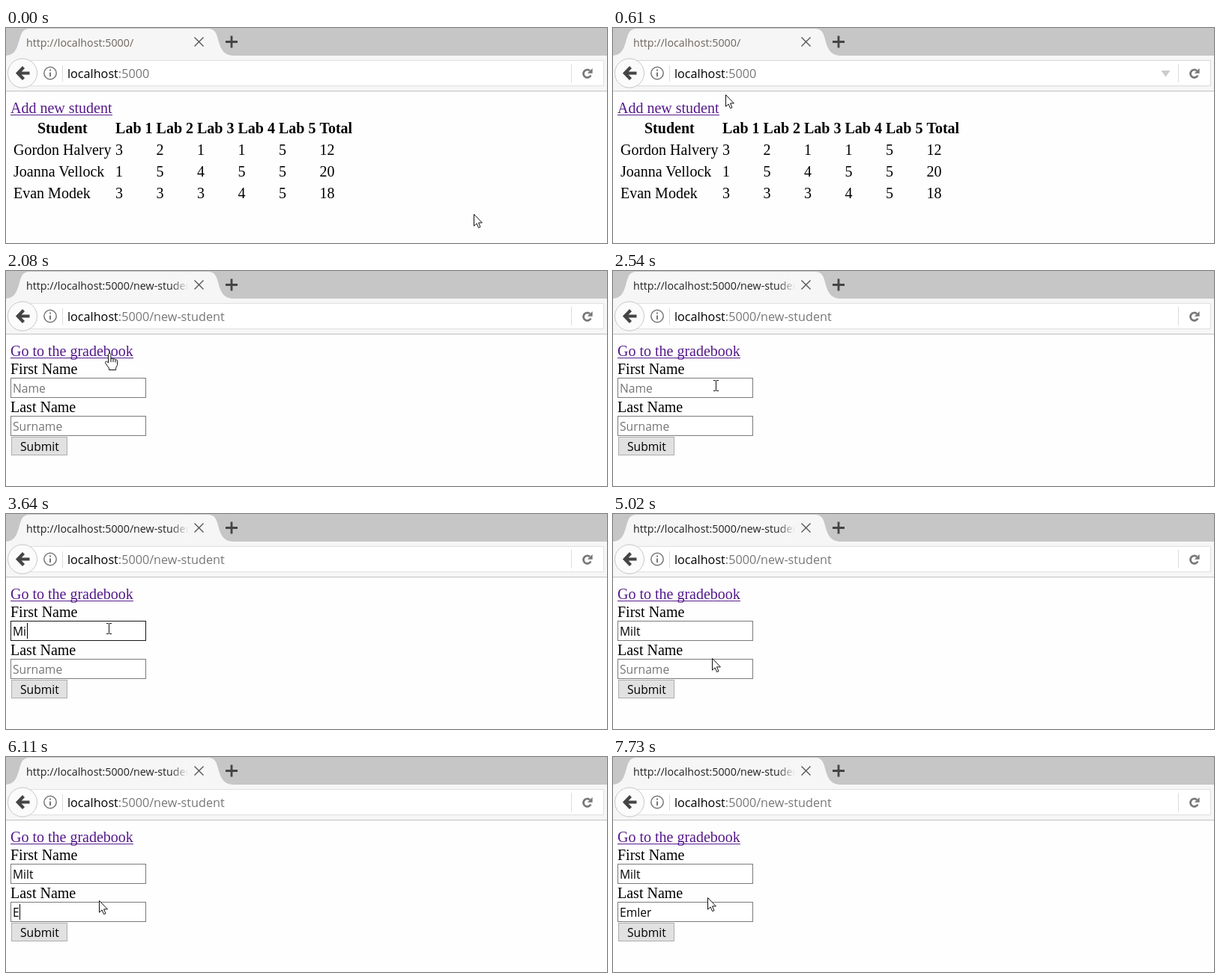
Write an HTML page that moves like this. It is 802 px wide and 288 px high and loops after 8 s.

```html
<!DOCTYPE html>
<html lang="en">
<head>
<meta charset="utf-8">
<title>Gradebook</title>
<style>
html, body { margin: 0; width: 100%; height: 100%; overflow: hidden; background: #fefefe; }
svg { position: absolute; left: 0; top: 0; }
.ui { font-family: "Open Sans", "Noto Sans", sans-serif; }
.page { font: 20px "Liberation Serif", "Times New Roman", serif; }
.head { font-weight: bold; }
.link { fill: #551a8b; }
.tab { font-size: 14.25px; }
.url { font-size: 16.2px; }
.field { font-size: 15.65px; }
.hint { fill: #757575; }
.box { fill: #fff; stroke: #7a7a7a; }

/* All times are fractions of one 8 s loop: 1% = 80 ms */
.step { animation: 8s step-end infinite; }

.list { animation-name: list; }
.form { animation-name: form; }
@keyframes list { 0% { opacity: 1 } 23.25%, 100% { opacity: 0 } }
@keyframes form { 0% { opacity: 0 } 23.25%, 100% { opacity: 1 } }

.bar-hover { animation: bar 8s linear infinite; }
@keyframes bar { 0%, 2.9% { opacity: 0 } 4.5%, 7% { opacity: 1 } 9.5%, 100% { opacity: 0 } }

.box1 { animation-name: box1; }
.box2 { animation-name: box2; }
@keyframes box1 { 0% { stroke: #7a7a7a } 33.875% { stroke: #171717 } 61.75%, 100% { stroke: #7a7a7a } }
@keyframes box2 { 0% { stroke: #7a7a7a } 64.75% { stroke: #171717 } 68.25%, 100% { stroke: #7a7a7a } }

.hint1 { animation-name: hint1; }
.hint2 { animation-name: hint2; }
@keyframes hint1 { 0% { opacity: 1 } 41.5%, 100% { opacity: 0 } }
@keyframes hint2 { 0% { opacity: 1 } 76.375%, 100% { opacity: 0 } }

/* Typed text: the width reveals letters, the right border is the caret */
.typed {
  position: absolute; left: 9px; width: 0; height: 21px; line-height: 22px;
  overflow: hidden; white-space: pre; color: #000;
  border-right: 1px solid transparent;
}
.first { top: 146px; animation-name: type1, caret1; }
.last { top: 197px; animation-name: type2, caret2; }
@keyframes type1 {
  0% { width: 0 } 41.5% { width: 14.6px } 45.5% { width: 18.6px }
  49.375% { width: 22.5px } 51.25%, 100% { width: 27.6px }
}
@keyframes caret1 {
  0% { border-color: transparent } 33.875% { border-color: #000 }
  38.625% { border-color: transparent } 41.5% { border-color: #000 }
  57% { border-color: transparent } 63.75% { border-color: #000 }
  66.625%, 100% { border-color: transparent }
}
@keyframes type2 {
  0% { width: 0 } 76.375% { width: 9px } 82.125% { width: 23.3px }
  85% { width: 27.3px } 87.875% { width: 36px } 88.875%, 100% { width: 42.4px }
}
@keyframes caret2 {
  0% { border-color: transparent } 67.6% { border-color: #000 }
  72.375% { border-color: transparent } 76.375% { border-color: #000 }
  95.75%, 100% { border-color: transparent }
}

.pointer { animation: move 8s linear infinite; }
@keyframes move {
  0%, .5% { transform: translate(624px, 249px); animation-timing-function: ease-out }
  4.75%, 6.4% { transform: translate(163px, 64px) }
  7.6%, 8.5% { transform: translate(150px, 89px); animation-timing-function: ease-out }
  11.5%, 22% { transform: translate(138px, 106px) }
  22.3%, 26.9% { transform: translate(138px, 110px); animation-timing-function: ease-in-out }
  31.75%, 60.8% { transform: translate(137px, 153px) }
  62.7%, 63.7% { transform: translate(132px, 193px) }
  64.75%, 66.6% { transform: translate(128px, 206px) }
  68.625%, 96.5% { transform: translate(124px, 192px) }
  96.6%, 100% { transform: translate(126px, 188px) }
}
.arrow { animation-name: arrow; }
.hand { animation-name: hand; }
.beam { animation-name: beam; }
@keyframes arrow {
  0% { opacity: 1 } 2.9% { opacity: 0 } 7% { opacity: 1 } 10% { opacity: 0 }
  28.4% { opacity: 1 } 30.2% { opacity: 0 } 61.75% { opacity: 1 }
  63.9% { opacity: 0 } 68%, 100% { opacity: 1 }
}
@keyframes hand { 0% { opacity: 0 } 10% { opacity: 1 } 28.4%, 100% { opacity: 0 } }
@keyframes beam {
  0% { opacity: 0 } 2.9% { opacity: 1 } 7% { opacity: 0 } 30.2% { opacity: 1 }
  61.75% { opacity: 0 } 63.9% { opacity: 1 } 68%, 100% { opacity: 0 }
}
</style>
</head>
<body>
<svg width="802" height="288" viewBox="0 0 802 288">
  <defs>
    <linearGradient id="fade">
      <stop offset="0" stop-color="#f6f6f6" stop-opacity="0"/>
      <stop offset="1" stop-color="#f6f6f6"/>
    </linearGradient>
    <clipPath id="title"><path d="M20 0H242V37H20Z"/></clipPath>
  </defs>

  <!-- Browser chrome -->
  <path fill="#c6c6c6" d="M0 0H802V37H0Z"/>
  <path fill="#f6f6f6" d="M0 37C11 36 14 29 17 19C20 7 22 1 31 1H270C279 1 281 7 284 19C287 29 291 36 302 37H802V84H0Z"/>
  <path stroke="#c2c2c2" d="M0 84.5H802"/>
  <g class="ui tab">
    <text class="step list" x="27" y="24.5" fill="#6e655e">http://localhost:5000/</text>
    <g class="step form" clip-path="url(#title)">
      <text x="27" y="24.5" fill="#222">http://localhost:5000/new-student</text>
      <path fill="url(#fade)" d="M220 4H243V34H220Z"/>
    </g>
  </g>
  <path stroke="#555" stroke-width="1.4" d="M251.5 12.5L263.5 24.5M263.5 12.5L251.5 24.5"/>
  <path stroke="#444" stroke-width="2.8" d="M293 18.5H309M301 10.5V26.5"/>

  <path fill="#fff" stroke="#e0e0e0" d="M32.5 43.5H797.5V77.5H32.5Z"/>
  <g class="bar-hover">
    <path fill="none" stroke="#d6d6d6" d="M32.5 43.5H797.5V77.5H32.5Z"/>
    <path fill="#bbb" d="M731.5 57H743.5L737.5 65.5Z"/>
  </g>
  <circle cx="22" cy="60.5" r="19.5" fill="#fbfbfb" stroke="#c6c6c6"/>
  <path fill="none" stroke="#444" stroke-width="4.2" d="M23.5 52.5L15.8 60.5L23.5 68.5M15.8 60.5H31.5"/>
  <circle cx="59" cy="60.5" r="8.2" fill="none" stroke="#777" stroke-width="1.5"/>
  <path stroke="#777" stroke-width="2" d="M59 59.5V65M59 55.5V57.5"/>
  <path stroke="#dcdcdc" d="M75.5 50V72M754.5 48V73"/>
  <path fill="none" stroke="#777" stroke-width="2.7" d="M780.4 63.5A5.2 5.2 0 1 1 779.1 57.2"/>
  <path fill="#777" d="M782.6 54V60.8H775.8Z"/>
  <g class="ui url">
    <text x="82" y="67">localhost<tspan fill="#777">:5000</tspan></text>
    <g class="step form">
      <path fill="#fff" d="M80 48H400V73H80Z"/>
      <text x="82" y="67">localhost<tspan fill="#777">:5000/new-student</tspan></text>
    </g>
  </g>

  <!-- Grade list -->
  <g class="page step list">
    <text class="link" x="6" y="114">Add new student</text>
    <path stroke="#551a8b" d="M6 116.5H142"/>
    <g id="grades"></g>
  </g>

  <!-- New student form -->
  <g class="step form">
    <g class="page">
      <text class="link" x="6" y="114">Go to the gradebook</text>
      <path stroke="#551a8b" d="M6 116.5H170"/>
      <text x="6" y="138">First Name</text>
      <text x="6" y="189">Last Name</text>
    </g>
    <rect class="box step box1" x="6.5" y="143.5" width="180" height="26"/>
    <rect class="box step box2" x="6.5" y="194.5" width="180" height="26"/>
    <rect x="7.5" y="222.5" width="74" height="24" fill="#e1e1e1" stroke="#adadad"/>
    <g class="ui field">
      <text class="hint step hint1" x="9" y="163">Name</text>
      <text class="hint step hint2" x="9" y="214">Surname</text>
      <text x="19" y="241">Submit</text>
    </g>
  </g>
</svg>

<div class="ui field typed step first">Milt</div>
<div class="ui field typed step last">Emler</div>

<svg width="802" height="288" viewBox="0 0 802 288">
  <g class="pointer" fill="#fff" stroke="#111" stroke-linejoin="round">
    <path class="step arrow" d="M.5 .5V16.2L4.1 12.9L6.6 18.6L9 17.6L6.5 11.9H11.4Z"/>
    <g class="step hand">
      <path d="M-1.5 13V1.8C-1.5 -.2 2 -.2 2 1.8V8C2.4 6.6 5 6.8 5 8.4C5.6 7.3 8 7.6 8 9.2C8.8 8.4 10.6 8.7 10.6 10.3V15.2C10.6 17 8.6 19 8.6 20.2V22.5H-.5V20.2C-2 18 -4 15.6 -5.3 13.4C-6.3 11.4 -4 10.2 -2.8 11.8Z"/>
      <path fill="none" d="M2 8V12M5 8.4V12M8 9.2V12.5"/>
    </g>
    <path class="step beam" fill="none" d="M-3 -6.5H0M1 -6.5H4M.5 -6V7M-3 7.5H0M1 7.5H4"/>
  </g>
</svg>

<script>
const heads = ['Lab 1', 'Lab 2', 'Lab 3', 'Lab 4', 'Lab 5', 'Total'];
const rows = [
  ['Gordon Halvery', 3, 2, 1, 1, 5],
  ['Joanna Vellock', 1, 5, 4, 5, 5],
  ['Evan Modek', 3, 3, 3, 4, 5]
];
const colX = i => 146.1 + 54.46 * i;

function cell(text, x, y, cls = '') {
  return `<text class="${cls}" x="${x}" y="${y}">${text}</text>`;
}

let cells = cell('Student', 42, 141, 'head');
heads.forEach((h, i) => cells += cell(h, colX(i), 141, 'head'));
rows.forEach(([name, ...marks], r) => {
  const y = 170 + 29 * r;
  const total = marks.reduce((a, b) => a + b);
  cells += cell(name, 10, y);
  [...marks, total].forEach((m, i) => cells += cell(m, colX(i), y));
});
document.getElementById('grades').innerHTML = cells;
</script>
</body>
</html>
```
